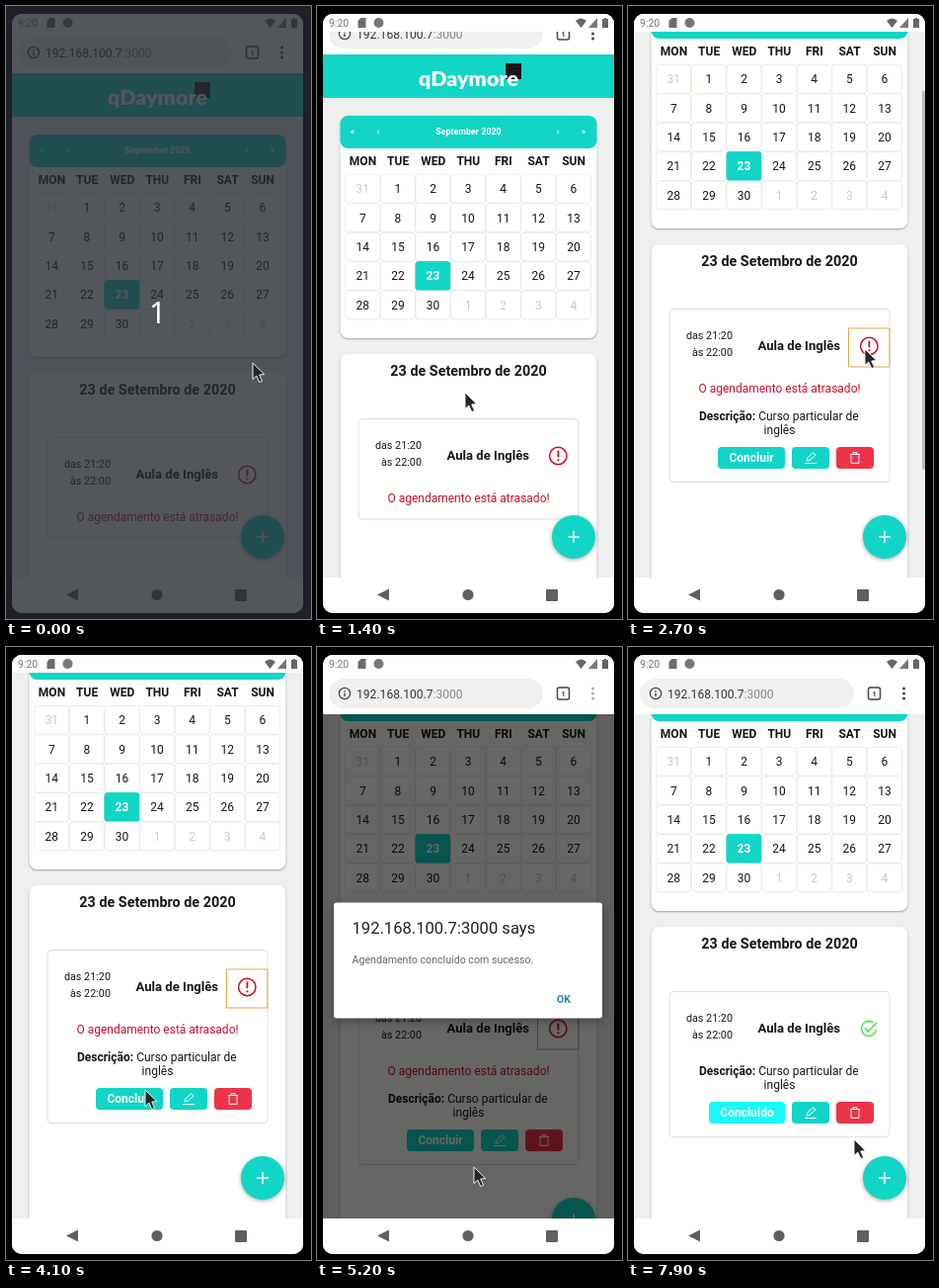
Write an HTML page with a canvas that moves like this. It is 309 px wide and 620 px high and loops after 8000 ms.

```html
<!DOCTYPE html>
<html lang="pt">
<head>
<meta charset="utf-8">
<title>Agenda</title>
<style>
  html, body { margin: 0; width: 100%; height: 100%; overflow: hidden; background: #000; }
  canvas { display: block; width: 309px; height: 620px; }
</style>
</head>
<body>
<canvas width="309" height="620"></canvas>
<script>
const canvas = document.querySelector('canvas');
const c = canvas.getContext('2d');
const LOOP = 8000, STEP = 100, TOOLBAR = 42;
const TEAL = '#11d5c6', RED = '#c8102e', INK = '#161616', GREY = '#5f5f5f';

// Tracks: [time, value, ...], linear between keys
const CURSOR = [
  [0, 250, 361], [400, 127, 571], [500, 127, 571], [600, 139, 500], [700, 146, 432],
  [1100, 146, 432], [1400, 150, 391], [1800, 150, 315], [2000, 150, 300],
  [2400, 228, 340], [2500, 228, 340], [2600, 240, 347], [2800, 240, 347],
  [3100, 249, 400], [3200, 249, 400], [3500, 152, 476], [4000, 152, 476],
  [4100, 141, 448], [4800, 141, 448], [5200, 159, 526], [5300, 159, 526],
  [6200, 230, 380], [6400, 244, 358], [6900, 244, 358], [7300, 241, 454],
  [7600, 241, 454], [7700, 231, 497], [7800, 231, 497], [7900, 229, 498]
];
const DRAG = [[1100, 0], [1200, 3], [1300, 9], [1400, 19], [1800, 111], [2000, 128], [2400, 130]];
const REVEAL = [[4700, 0], [5000, TOOLBAR]];
const FAB_SHIFT = [[4700, 0], [5000, TOOLBAR], [7000, TOOLBAR], [7200, 0]];
const SCROLLBAR = [[2500, 1], [2900, 0]];
const DIALOG = [[4800, 0], [5200, 1], [6800, 1], [6900, .85], [7100, 0]];
const SCRIM = [[4800, 0], [5200, .6], [6800, .6], [6900, .52], [7200, 0]];
const COUNTDOWN = [[0, 1], [400, 0]];

function track(keys, t) {
  const i = keys.findIndex(k => k[0] > t);
  if (i < 0) return keys[keys.length - 1].slice(1);
  if (i === 0) return keys[0].slice(1);
  const a = keys[i - 1], b = keys[i], u = (t - a[0]) / (b[0] - a[0]);
  return a.slice(1).map((v, j) => v + (b[j + 1] - v) * u);
}

function text(s, x, y, size, color = INK, { weight = 400, align = 'center', font = 'Roboto' } = {}) {
  c.font = `${weight} ${size}px ${font}, sans-serif`;
  c.textAlign = align;
  c.fillStyle = color;
  c.fillText(s, x, y + size * .355);
  return c.measureText(s).width;
}

function box(x, y, w, h, r, fill, stroke, line = 1) {
  c.beginPath();
  c.roundRect(x, y, w, h, r);
  if (fill) { c.fillStyle = fill; c.fill(); }
  if (stroke) { c.strokeStyle = stroke; c.lineWidth = line; c.stroke(); }
}

function disc(x, y, r, fill, stroke, line = 1) {
  box(x - r, y - r, 2 * r, 2 * r, r, fill, stroke, line);
}

function path(d, x, y, fill, stroke, line = 1) {
  c.save();
  c.translate(x, y);
  const p = new Path2D(d);
  if (fill) { c.fillStyle = fill; c.fill(p); }
  if (stroke) { c.strokeStyle = stroke; c.lineWidth = line; c.lineJoin = 'round'; c.stroke(p); }
  c.restore();
}

function shadowed(draw, blur = 2, dy = 1, color = 'rgba(0,0,0,.35)') {
  c.save();
  c.shadowBlur = blur;
  c.shadowOffsetY = dy;
  c.shadowColor = color;
  draw();
  c.restore();
}

function calendar() {
  shadowed(() => box(23.5, 130, 260, 225, 8, '#fffffd'));
  box(23.5, 130, 260, 33, 8, TEAL);
  const bold = { weight: 700 };
  text('September 2020', 153.5, 146, 8.9, '#fff', bold);
  [['«', 36], ['‹', 62], ['›', 244], ['»', 270]].forEach(([s, x]) => text(s, x, 145.5, 9, '#fff', bold));
  const pitch = 35.6;
  ['MON', 'TUE', 'WED', 'THU', 'FRI', 'SAT', 'SUN'].forEach((d, i) => text(d, 46.5 + i * pitch, 175.5, 12, INK, bold));
  for (let i = 0; i < 35; i++) {
    const x = 46.3 + i % 7 * pitch, y = 204 + Math.floor(i / 7) * 29.4;
    const inMonth = i > 0 && i < 31, chosen = i === 23;
    const day = i === 0 ? 31 : i > 30 ? i - 30 : i;
    box(x - 17.6, y - 14.7, 35.2, 29, 3, chosen ? TEAL : null, chosen ? TEAL : '#e6e6e4', .8);
    text(day, x, y, 12, chosen ? '#fff' : inMonth ? INK : '#c9c9c7', { weight: chosen ? 700 : 400 });
  }
}

function statusIcon(done) {
  if (done) {
    c.beginPath();
    c.arc(244, 474, 7.5, .1, 5.4);
    c.strokeStyle = '#48dc48';
    c.lineWidth = 1.4;
    c.stroke();
    path('M-4 -1 L-1 3 L8 -6', 244, 474, null, '#48dc48', 1.5);
  } else {
    disc(244.3, 474, 8.7, null, RED, 1.5);
    box(243.5, 468.5, 1.8, 7, .8, RED);
    disc(244.4, 478.3, 1.1, RED);
  }
}

function buttons(y, done) {
  const left = done ? 82 : 91;
  box(left, y, 159 - left, 22, 4, done ? '#16fbfa' : TEAL);
  text(done ? 'Concluído' : 'Concluir', (left + 159) / 2, y + 11, 12, '#fff', { weight: 700 });
  box(166, y, 38, 22, 4, TEAL);
  path('M-4 3 L-3.3 0 L2.8 -5.3 L5 -3 L-1 2.4 Z M-6 5.5 H6', 185, y + 11, null, '#fff');
  box(211, y, 38, 22, 4, '#ee334a');
  path('M-5 -3.5 H5 M-2 -3.5 V-5.3 H2 V-3.5 M-4 -3.5 V5.3 H4 V-3.5', 230, y + 11, null, '#fff');
}

function agenda(t) {
  const open = t >= 2700, done = t >= 7000, shift = done ? -28 : 0;
  shadowed(() => box(23.5, 371, 260, 420, 8, '#fffffd'));
  text('23 de Setembro de 2020', 153.5, 388, 14.36, INK, { weight: 700 });
  box(42, 436.5, 223, (open ? 175 : 101.5) + shift, 4, null, '#dededc');
  text('das 21:20', 106, 463, 10.8, INK, { align: 'right' });
  text('às 22:00', 106, 480.5, 10.8, INK, { align: 'right' });
  text('Aula de Inglês', 131.5, 473.5, 13.1, INK, { weight: 700, align: 'left' });
  if (open && !done) {
    const alerted = t >= 4900;
    c.setLineDash(alerted ? [1, 1] : []);
    box(223.5, 456, 41.5, 39, 0, null, alerted ? RED : '#dba84c');
    c.setLineDash([]);
  }
  statusIcon(done);
  if (!done) text('O agendamento está atrasado!', 153.5, 517, 12, RED);
  if (!open) return;
  const y = 545 + shift;
  const w = text('Descrição:', 72, y, 12, INK, { weight: 700, align: 'left' });
  text(' Curso particular de', 72 + w, y, 12, INK, { align: 'left' });
  text('inglês', 153.5, y + 14, 12);
  buttons(y + 31, done);
}

function header() {
  c.fillStyle = TEAL;
  c.fillRect(6, 68, 295, 44);
  box(191, 77, 16, 16, 0, INK);
  text('qDaymore', 153.5, 92, 21.5, '#fff', { weight: 900, font: 'Lato' });
}

function addButton(y) {
  shadowed(() => disc(260, y, 22, TEAL), 4, 1);
  path('M-6 0 H6 M0 -6 V6', 260, y, null, '#fff', 1.5);
}

function toolbar(hidden, menuColor) {
  c.save();
  c.translate(0, -hidden);
  c.fillStyle = '#fffffd';
  c.fillRect(6, 26, 295, 42);
  box(12, 32, 217, 30, 15, '#f0f1ef');
  disc(28, 47, 5.6, null, '#444', 1.3);
  path('M0 -3 V-1.6 M0 -.4 V3', 28, 47, null, '#444', 1.4);
  const w = text('192.168.100.7', 40, 47.5, 12.1, '#333', { align: 'left' });
  text(':3000', 40 + w, 47.5, 12.1, '#888', { align: 'left' });
  box(243.5, 41, 12, 12, 2, null, '#444', 1.5);
  text('1', 249.5, 47, 8, '#444', { weight: 700 });
  [42, 47, 52].forEach(y => disc(279.5, y, 1.5, menuColor));
  c.restore();
}

function systemBars() {
  c.fillStyle = '#fffffd';
  c.fillRect(6, 8, 295, 18);
  c.fillRect(6, 578, 295, 36);
  text('9:20', 12, 17.3, 10.5, '#777', { align: 'left' });
  path('M3 0 H8 V10 H0 V3 Z', 41.5, 12, '#6c6c6c');
  disc(62.5, 17, 5, '#777');
  path('M0 3 Q5.5 -2 11 3 L5.5 10 Z', 262, 12, '#666');
  path('M9 0 V10 H0 Z', 275, 12, '#777');
  path('M2 0 H4 V1 H6 V10 H0 V1 H2 Z', 289, 12, '#666');
  path('M12 -6 V6 L0 0 Z', 61, 595.5, GREY);
  disc(153, 595.5, 5.6, GREY);
  box(232, 590, 12, 12, 1, GREY);
}

function dialog(alpha, pressed) {
  if (!alpha) return;
  c.save();
  c.globalAlpha = alpha;
  shadowed(() => box(17, 258.5, 272, 117, 3, '#fffffd'), 10, 3);
  text('192.168.100.7:3000 says', 35.5, 284, 16.6, '#222', { align: 'left' });
  text('Agendamento concluído com sucesso.', 35.5, 316, 10.64, '#666', { align: 'left' });
  if (pressed) box(218, 342, 61, 28, 9, '#cfe1ea');
  text('OK', 250, 356, 10.5, '#2387a8', { weight: 700 });
  c.restore();
}

function countdown(alpha) {
  if (!alpha) return;
  c.globalAlpha = alpha;
  c.fillStyle = 'rgba(37,42,50,.79)';
  c.fillRect(0, 0, 309, 620);
  text('1', 153.5, 310.5, 30, '#fff', { font: '"Noto Sans"' });
  c.globalAlpha = 1;
}

function draw(t) {
  const [drag] = track(DRAG, t), [reveal] = track(REVEAL, t);
  const hidden = Math.min(drag, TOOLBAR) - reveal;
  const scrolled = Math.max(0, drag - TOOLBAR);

  c.fillStyle = '#000';
  c.fillRect(0, 0, 309, 620);
  c.save();
  c.beginPath();
  c.roundRect(6, 8, 295, 606, 10);
  c.clip();
  c.fillStyle = '#efefed';
  c.fillRect(6, 8, 295, 606);

  c.save();
  c.translate(0, reveal - drag);
  header();
  calendar();
  agenda(t);
  c.restore();

  addButton(537 + track(FAB_SHIFT, t)[0]);
  if (scrolled) {
    c.fillStyle = `rgba(0,0,0,${.42 * track(SCROLLBAR, t)[0]})`;
    c.fillRect(298, 68 - hidden + scrolled * .68, 3, 383);
  }
  c.fillStyle = `rgba(0,0,0,${track(SCRIM, t)[0]})`;
  c.fillRect(6, 26, 295, 552);
  toolbar(hidden, t >= 4900 && t < 6900 ? '#aaa' : '#444');
  systemBars();
  dialog(track(DIALOG, t)[0], t >= 6800);
  c.restore();

  countdown(track(COUNTDOWN, t)[0]);
  const [x, y] = track(CURSOR, t);
  path('M0 0 V16.5 L3.8 13 L6.8 19.6 L9.6 18.4 L6.7 12 L11.8 11.6 Z', x, y, '#252525', '#fff', .9);
}

function frame(now) {
  draw(Math.floor(now % LOOP / STEP) * STEP);
  requestAnimationFrame(frame);
}
requestAnimationFrame(frame);
</script>
</body>
</html>
```
